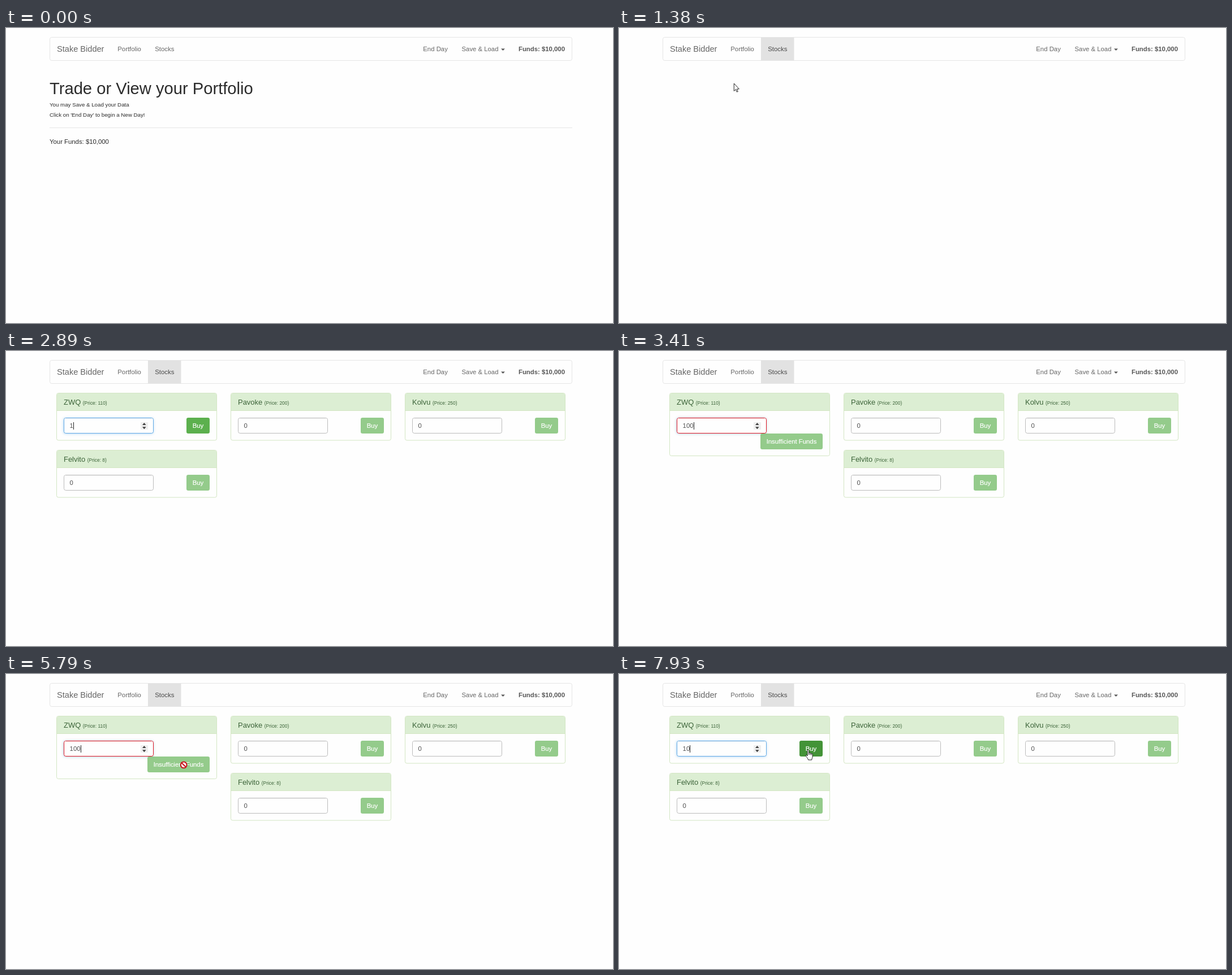
Animation, 1073 px wide and 522 px high, one loop 8 s. Source, as an HTML page:

```html
<!DOCTYPE html>
<html lang="en">
<head>
<meta charset="utf-8">
<title>Stake Bidder</title>
<style>
html, body { margin: 0; width: 100%; height: 100%; overflow: hidden; background: #fefefe; }
svg { display: block; font: 11.35px "Liberation Sans", Arial, sans-serif; }
</style>
</head>
<body>
<svg id="stage" width="1073" height="522" viewBox="0 0 1073 522"></svg>
<script>
const LOOP = 8000, stage = document.getElementById('stage');

// Bursts of screen updates: start, end, number of updates
const BURSTS = [
  [60, 330, 5], [560, 870, 5], [1010, 1600, 9], [1750, 2200, 7], [2890, 3410, 8], [3720, 4290, 8],
  [4520, 4620, 2], [4760, 5470, 11], [5580, 6300, 10], [6990, 7700, 10], [7800, 7930, 2]
];

// Pointer path: time, x, y, shape
const PATH = [
  [0, 0, 0, ''], [60, 890, 505, 'arrow'], [330, 117, 33, 'hand'], [560, 118, 26, 'hand'],
  [640, 139, 40, 'hand'], [720, 213, 44, 'hand'], [870, 275, 48, 'hand'], [1230, 275, 48, 'hand'],
  [1300, 250, 75, 'arrow'], [1450, 160, 118, 'beam'], [1526, 137, 126, 'beam'],
  [1750, 137, 126, 'beam'], [2050, 4, 132, 'beam'], [2200, 45, 132, 'arrow'], [2890, 45, 132, ''],
  [3720, 190, 232, 'arrow'], [4290, 202, 209, 'arrow'], [4520, 203, 209, 'arrow'],
  [4620, 203.5, 209, 'arrow'], [4760, 207.5, 196, 'arrow'], [5150, 380, 165, 'arrow'],
  [5300, 340, 155, 'ban'], [5470, 345, 152, 'ban'], [5580, 343, 153, 'ban'],
  [5820, 290, 155, 'ban'], [6060, 350, 155, 'ban'], [6300, 312, 151.5, 'ban'],
  [7140, 312, 151.5, ''], [7380, 318, 152, 'arrow'], [7460, 325, 138, 'hand'],
  [7700, 331, 135, 'hand'], [7930, 329.5, 133.5, 'hand'], [LOOP, 329.5, 133.5, 'hand']
];

const TYPED = [[0, '0'], [2890, '1'], [3100, '10'], [3250, '100'], [7140, '10']];
const CARET_OFF = [[0, 2890], [3720, 4260], [4800, 5320], [5850, 6300], [7640, 7900]];

const SHAPES = {
  arrow: '<path d="M.5.5V14L3.6 11.1 5.5 15.6 7.5 14.8 5.6 10.4H9.6Z" fill="#fff" stroke="#222"/>',
  hand: '<path d="M3.6 11.5V1.9C3.6.2 6.1.2 6.1 1.9V6.4C6.4 5.5 8.4 5.6 8.4 7 8.8 6.2 10.5 6.4 10.6 7.8 11 7.1 12.6 7.3 12.6 8.8V12.5C12.6 15 11.3 15.6 11.2 18.5H5C5 16.5 2 13.5.8 11.2.2 9.8 1.8 8.9 3.6 11.5Z" fill="#fff" stroke="#222"/>' +
    '<path d="M6.1 6.4V9.5M8.4 7V9.8M10.6 7.8V10" stroke="#222"/>',
  beam: '<path d="M.5.8H2.3L3 1.5 3.7.8H5.5M3 1.5V12M.5 12.7H2.3L3 12 3.7 12.7H5.5" fill="none" stroke="#222" stroke-width="1.2"/>',
  ban: '<circle cx="6.5" cy="6.5" r="5.4" fill="#fff" stroke="#c8141e" stroke-width="2.1"/><path d="M2.8 2.8 10.2 10.2" stroke="#c8141e" stroke-width="2.1"/>'
};

const clamp = v => Math.min(1, Math.max(0, v));
const easeOut = p => 1 - (1 - clamp(p)) ** 2;
const last = (list, t) => list.filter(k => k[0] <= t).pop();
const text = (x, y, s, fill = '#666', more = '') => `<text x="${x}" y="${y}" fill="${fill}" ${more}>${s}</text>`;
const rect = (x, y, w, h, fill, more = '') => `<rect x="${x}" y="${y}" width="${w}" height="${h}" fill="${fill}" ${more}/>`;
const slide = (gone, body) => `<g transform="translate(0 ${-24.3 * gone})" opacity="${1 - gone}">${body}</g>`;

function snap(t) {
  const burst = last(BURSTS, t);
  if (!burst) return 0;
  const [a, b, n] = burst, step = (b - a) / (n - 1);
  return Math.min(b, a + Math.floor((t - a) / step + 0.1) * step);
}

function pointerAt(t) {
  const i = PATH.findIndex(k => k[0] > t), a = PATH[i - 1], b = PATH[i];
  const p = a[3] && b[3] ? (t - a[0]) / (b[0] - a[0]) : 0;
  return { x: a[1] + (b[1] - a[1]) * p, y: a[2] + (b[2] - a[2]) * p, shape: a[3] };
}

function navbar(t, ptr) {
  const hover = ptr.shape === 'hand' && t < 1300;
  const tint = (a, b) => hover && ptr.x >= a && ptr.x < b ? '#333' : '#666';
  return rect(77.5, 16.5, 923, 41, '#fefefe', 'stroke="#e5e5e5" rx="3.2"') +
    (t >= 1010 ? rect(251, 17, 58.5, 40.5, '#e2e2e2') : '') +
    text(90, 42, 'Stake Bidder', hover && ptr.x < 175 ? '#4c4c4c' : '#666', 'font-size="14.58"') +
    text(197.3, 41.3, 'Portfolio', tint(185, 240)) +
    text(263.3, 41.3, 'Stocks', t >= 1010 ? '#484848' : tint(240, 310)) +
    text(737.3, 41.3, 'End Day') + text(805.5, 41.3, 'Save &amp; Load') +
    '<path d="M875 36.5H882L878.5 40Z" fill="#555"/>' +
    text(906, 41.3, 'Funds: $10,000', '#555', 'font-weight="bold"');
}

function home() {
  const ink = '#2b2b2b', small = 'font-size="9.72"';
  return text(77, 117, 'Trade or View your Portfolio', ink, 'font-size="29.17"') +
    text(77, 138.6, 'You may Save &amp; Load your Data', ink, small) +
    text(77, 157.4, "Click on 'End Day' to begin a New Day!", ink, small) +
    rect(77, 176, 924, 1, '#e6e6e6') + text(77, 205.2, 'Your Funds: $10,000', ink);
}

function button(x, y, w, label, fill, opacity) {
  return `<g opacity="${opacity}">` + rect(x, y, w, 28, fill, 'rx="3.2"') +
    text(x + w / 2, y + 18, label, '#fff', 'text-anchor="middle" stroke="#fff" stroke-width=".2"') + '</g>';
}

// state: value, focus, over, selected, caret, hot
function card(col, row, name, price, state = {}) {
  const { value = '0', focus, over, selected, caret, hot } = state;
  const poor = value * price > 10000, idle = !+value || poor;
  const border = poor ? '#e0141e' : focus ? '#62aae6' : '#bcbcbc';
  let s = rect(.5, .5, 283, poor ? 111 : 83.5, '#fefefe', 'stroke="#d3e6c3" rx="3.2"') +
    '<path d="M1 31V3.5Q1 1 3.5 1H280.5Q283 1 283 3.5V31Z" fill="#dceed3"/>' + rect(1, 31, 282, 1, '#d3e6c3') +
    `<text x="13" y="20.5" font-size="12.96" fill="#3b6338">${name} <tspan font-size="8.42">(Price: ${price})</tspan></text>`;
  if (focus) s += rect(12.5, 44.5, 159, 28, '#66afe9', 'rx="4" opacity=".5" filter="url(#glow)"');
  s += rect(13.5, 44.5, 158, 27, '#fefefe', `stroke="${border}" rx="3.2"`) + rect(15, 45, 155, 1, '#f0f0f0');
  if (selected) s += rect(23.6, 52, 6.6, 13, '#3390ff');
  s += text(23.6, 62.2, value, selected ? '#fff' : '#505050');
  if (caret) s += rect(Math.round(23.6 + 6.31 * value.length), 52, 1, 13, '#222');
  if (focus || over) s += rect(149, 52, 13, 13, '#efefef') +
    '<path d="M152 57 155.3 53 158.6 57ZM152 60.2H158.6L155.3 64.2Z" fill="#404040"/>';
  const fill = hot ? '#439337' : '#5cb04e', alpha = idle ? .65 : 1;
  s += poor ? button(161, 72, 110, 'Insufficient Funds', fill, alpha) : button(230, 44, 41, 'Buy', fill, alpha);
  return `<g transform="translate(${89 + 308 * col} ${74 + 101 * row})">${s}</g>`;
}

function stocks(t, ptr) {
  const value = last(TYPED, t)[1], focus = t >= 1750;
  const first = {
    value, focus,
    over: ptr.shape === 'beam' && ptr.x > 100,
    selected: focus && t < 2890 && (ptr.x < 113 || t > 2100),
    caret: !CARET_OFF.some(([a, b]) => t >= a && t < b),
    hot: t > 7400 && ptr.shape === 'hand'
  };
  return card(0, 0, 'ZWQ', 110, first) + card(1, 0, 'Pavoke', 200) + card(2, 0, 'Kolvu', 250) +
    card(value === '100' ? 1 : 0, 1, 'Felvito', 8);
}

function draw(t) {
  const ptr = pointerAt(t);
  const out = easeOut((t - 1085) / 215), away = 1 - easeOut((t - 1395) / 205);
  stage.innerHTML = '<filter id="glow" x="-10%" y="-50%" width="120%" height="200%"><feGaussianBlur stdDeviation="2"/></filter>' +
    navbar(t, ptr) + (out < 1 ? slide(out, home()) : '') + (away < 1 ? slide(away, stocks(t, ptr)) : '') +
    (ptr.shape ? `<g transform="translate(${ptr.x} ${ptr.y})">${SHAPES[ptr.shape]}</g>` : '');
}

let shown = -1;
function tick() {
  const t = snap(performance.now() % LOOP);
  if (t !== shown) draw(shown = t);
  requestAnimationFrame(tick);
}
tick();
</script>
</body>
</html>
```
